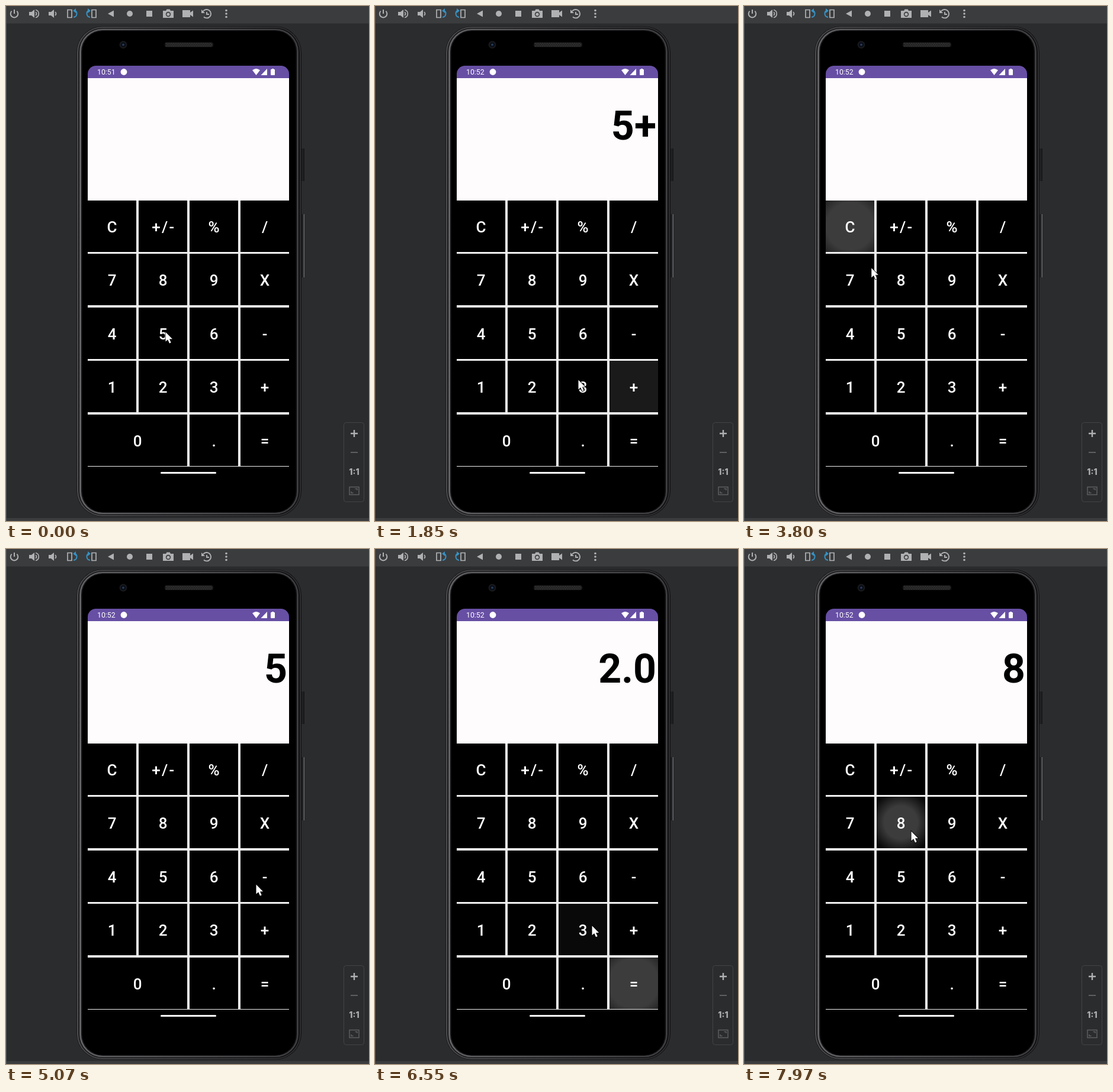
Write an HTML page with a canvas that moves like this. It is 613 px wide and 871 px high and loops after 8000 ms.

```html
<!DOCTYPE html>
<html lang="en">
<head>
<meta charset="utf-8">
<title>Calculator</title>
<style>
html, body { margin: 0; height: 100%; overflow: hidden; background: #2b2c2e; }
canvas { display: block; width: 100vw; height: 100vh; }
</style>
</head>
<body>
<canvas id="stage" width="613" height="871"></canvas>
<script>
const c = document.getElementById('stage').getContext('2d');
const LOOP = 8000, LAG = 40, FADE_END = 570;
const ICON = '#afb1b3', DIM = '#5c5e60', BLUE = '#3592c4', BAR = '#3b3c3e';

// Key presses: time, key, and where the pointer clicks
const presses = [
  [80, '5', 269, 551], [1340, '+', 448, 652], [2060, '3', 343, 632], [2850, '=', 443, 718],
  [3700, 'C', 186, 372], [4370, '5', 263, 561], [5320, '-', 422, 567], [6000, '3', 335, 631],
  [6440, '=', 430, 726], [7390, 'C', 172, 366], [7930, '8', 282, 477],
].map(([time, key, x, y]) => ({ time, key, x, y }));

const keys = [];
['C +/- % /', '7 8 9 X', '4 5 6 -', '1 2 3 +', '0  . ='].forEach((row, r) =>
  row.split(' ').forEach((label, i) => {
    if (label) keys.push({ label, x: 138 + 86 * i, y: Math.round(329 + 90.4 * r), w: label === '0' ? 168 : 82, h: 87 });
  }));

function rect(x, y, w, h, fill) {
  c.fillStyle = fill;
  c.fillRect(x, y, w, h);
}

function round(x, y, w, h, r, fill, stroke, width = 1) {
  c.beginPath();
  c.roundRect(x, y, w, h, r);
  if (fill) { c.fillStyle = fill; c.fill(); }
  if (stroke) { c.strokeStyle = stroke; c.lineWidth = width; c.stroke(); }
}

function disc(x, y, r, fill) {
  c.fillStyle = fill;
  c.beginPath();
  c.arc(x, y, r, 0, 7);
  c.fill();
}

function shape(d, fill, x = 0, y = 0) {
  c.save();
  c.translate(x, y);
  c.fillStyle = fill;
  c.fill(new Path2D(d));
  c.restore();
}

function line(d, color, width = 2, x = 0, y = 0) {
  c.save();
  c.translate(x, y);
  c.strokeStyle = color;
  c.lineWidth = width;
  c.stroke(new Path2D(d));
  c.restore();
}

function text(s, x, y, font, fill, align = 'center', spacing = 0) {
  c.font = font;
  c.fillStyle = fill;
  c.textAlign = align;
  c.letterSpacing = spacing + 'px';
  c.fillText(s, x, y);
}

function toolbar() {
  rect(0, 0, 613, 29.5, BAR);
  rect(0, 866, 613, 5, BAR);
  rect(0, 0, 1, 871, '#505355');
  line('M-4.4-4.4A6.3 6.3 0 1 0 4.4-4.4M0-7V0', ICON, 2, 14, 13);
  for (const x of [47, 80]) {
    shape('M-8-3H-4L1-7V7L-4 3H-8Z', ICON, x, 13);
    line('M3-3Q6 0 3 3', ICON, 1.7, x, 13);
  }
  line('M3-6.5C10-5 10 5 3 6.5', ICON, 1.7, 47, 13);
  for (const [x, dir] of [[112, 1], [144, -1]]) {
    c.save();
    c.translate(x, 13);
    c.scale(dir, 1);
    line('M-8-6.5H-1V6.5H-8Z', ICON, 1.7);
    line('M2 6C9 5 9-4 4-5', BLUE, 2);
    shape('M1-5L6-9V-1Z', BLUE);
    c.restore();
  }
  shape('M172 13L182 7.5V18.5Z', ICON);
  disc(209, 13, 5, ICON);
  rect(237, 8, 10, 10, ICON);
  shape('M-9-5H-4L-2.5-7.5H2.5L4-5H9V7H-9Z', ICON, 274, 13);
  disc(274, 14, 4.2, BAR);
  disc(274, 14, 2.6, ICON);
  shape('M-9-6H4V-2L9-5.5V5.5L4 2V6H-9Z', ICON, 307, 13);
  line('M-6-4A7.2 7.2 0 1 1-5 5.5M0-3V1H4', ICON, 1.9, 339, 13);
  shape('M-9-7V-1H-3Z', ICON, 339, 13);
  for (const y of [7.5, 13, 18.5]) disc(372, y, 1.8, ICON);
}

function zoomPanel() {
  round(570.5, 704.5, 34, 134, 4, '#2b2c2e', '#424446');
  line('M-6 0H6M0-6V6', ICON, 2.4, 588, 723);
  line('M-6 0H6', DIM, 2, 588, 755);
  text('1:1', 588, 793, '800 14px Inter, sans-serif', ICON);
  line('M-8-6.5H8V6.5H-8Z', DIM, 1.5, 588, 820);
  line('M1.5-3.5H5V-1M-5 1V3.5H-1.5', DIM, 1.5, 588, 820);
}

function phone() {
  for (const [y, h, edge] of [[241, 55, '#171719'], [352, 107, '#68696c']]) {
    rect(499, y, 5, h, '#1f2022');
    rect(502.5, y, 1.5, h, edge);
  }
  // Metal rim: two soft highlights across its width, dimmer to the right
  for (let i = 0; i < 10; i++) {
    const light = 16 + 80 * Math.exp(-((i - 1.5) ** 2)) + 105 * Math.exp(-((i - 6) ** 2) / 2);
    const rim = c.createLinearGradient(119, 0, 499, 0);
    rim.addColorStop(0, `rgb(${light},${light},${light + 3})`);
    rim.addColorStop(1, `rgb(${light * .6},${light * .6},${light * .6 + 2})`);
    round(119 + i, 34.5 + i * .8, 380 - 2 * i, 829 - 1.6 * i, 44 - i, rim);
  }
  round(129, 42.5, 360, 813, 34, '#000');
  disc(198, 65.5, 6.5, '#16181c');
  disc(198, 65.5, 3.8, '#070a12');
  disc(198, 65.5, 2, '#263859');
  round(268, 61.5, 82, 8, 3, '#1a1a1a');
  for (let y = 0; y < 3; y++)
    for (let x = 0; x < 26; x++) rect(270 + x * 3 + y % 2 * 1.5, 62.5 + y * 2.3, 1.5, 1.4, '#484848');
}

function statusBar(t) {
  round(138, 101, 340, 22, [14, 14, 0, 0], '#674fa4');
  text(t < 660 ? '10:51' : '10:52', 154, 116, '12.3px Roboto, sans-serif', '#fff', 'left');
  disc(199, 111.5, 5.4, '#fff');
  shape('M416 108.5Q422.5 103.5 429 108.5L422.5 117Z', '#fff');
  shape('M430.5 117L441 106V117Z', '#fff');
  round(447, 107, 7, 10, 1, '#fff');
  rect(449, 106, 3, 2, '#fff');
}

function ripple(key, age) {
  if (age < 0 || age >= FADE_END) return;
  const x = key.x + key.w / 2, y = key.y + key.h / 2;
  const strength = .235 * Math.min(1, (FADE_END - age) / 140);
  const glow = c.createRadialGradient(x, y, 20 + age * .2, x, y, 40 + age * .45);
  glow.addColorStop(0, `rgba(255,255,255,${strength})`);
  glow.addColorStop(1, 'rgba(255,255,255,0)');
  rect(key.x, key.y, key.w, key.h, glow);
}

function enter(shown, key) {
  if (key === 'C') return '';
  if (key !== '=') return shown + key;
  return shown.match(/[+-]?\d+/g).reduce((sum, n) => sum + Number(n), 0).toFixed(1);
}

function calculator(t) {
  rect(138, 122, 340, 207, '#fffcfe');
  rect(138, 329, 340, 450, '#f0f0f0');
  const shown = presses.filter(p => p.time + LAG <= t).reduce((s, p) => enter(s, p.key), '');
  text(shown, 475, 225.5, 'bold 68px Roboto, sans-serif', '#000', 'right');
  for (const key of keys) {
    rect(key.x, key.y, key.w, key.h, '#000');
    for (const p of presses) if (p.key === key.label) ripple(key, t - p.time);
    text(key.label, key.x + key.w / 2 + 1.2, key.y + 54, '500 26px Roboto, sans-serif', '#fff', 'center', 2.2);
  }
  round(261, 788, 94, 3, 1.5, '#fff');
}

// Glide from each click to the next, arriving a little before it
function pointer(t) {
  const i = Math.max(0, presses.findLastIndex(p => p.time <= t));
  const from = presses[i], to = presses[i + 1] || from;
  const arrive = to.time - 260, leave = Math.max(from.time, arrive - 700);
  const k = Math.min(1, Math.max(0, (t - leave) / (arrive - leave)));
  const ease = to === from ? 0 : Math.sin(k * Math.PI / 2);
  const x = from.x + (to.x - from.x) * ease, y = from.y + (to.y - from.y) * ease;
  const arrow = 'M.5.5V16.5L4.2 13.2L7 19.5L9.7 18.3L7 12.2H12Z';
  line(arrow, '#000', 1.6, x, y);
  shape(arrow, '#fff', x, y);
}

function draw(t) {
  rect(0, 0, 613, 871, '#2b2c2e');
  toolbar();
  zoomPanel();
  phone();
  statusBar(t);
  calculator(t);
  pointer(t);
}

let start;
function frame(now) {
  start ??= now;
  draw((now - start) % LOOP);
  requestAnimationFrame(frame);
}
draw(0);
requestAnimationFrame(frame);
</script>
</body>
</html>
```
